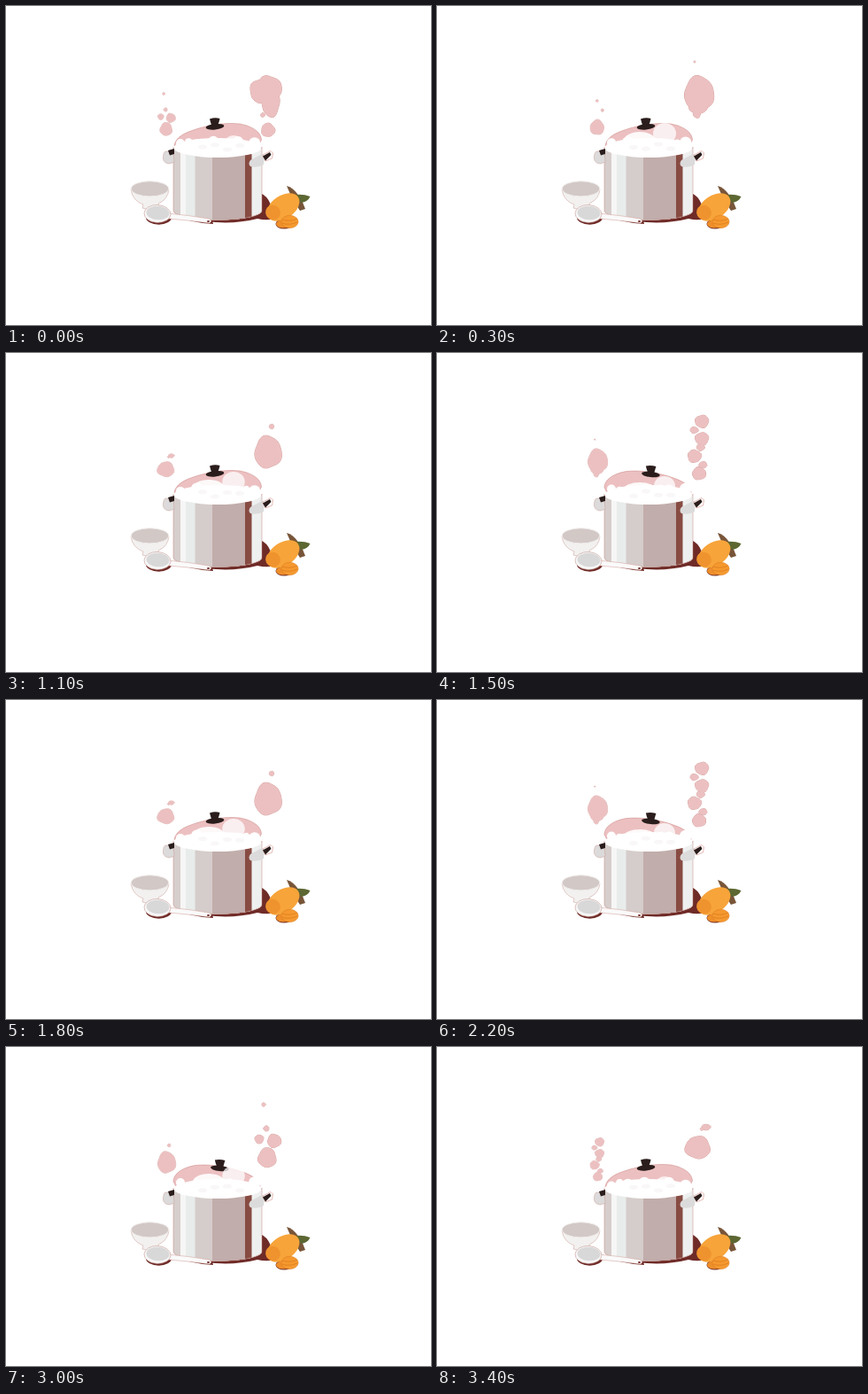
Write an HTML page with a canvas that moves like this. It is 480 px wide and 360 px high and loops after 3500 ms.

```html
<!DOCTYPE html>
<html lang="en">
<head>
<meta charset="utf-8">
<title>Boiling pot</title>
<style>
html, body { margin: 0; width: 100%; height: 100%; overflow: hidden; background: #fff; }
canvas { display: block; }
</style>
</head>
<body>
<canvas id="stage" width="480" height="360"></canvas>
<script>
const ctx = document.getElementById('stage').getContext('2d');
const LOOP = 3500, STEP = 100, STEAM_STEPS = 7, LID_HOLD = 4;
const PINK = '#ecc0c1', EDGE = '#c98580', SHADOW = '#6f2b27', DARK = '#2a1d1c';
const { PI, sin, cos } = Math;

function shape(path, fill, edge, width = 0.5) {
  const p = typeof path === 'string' ? new Path2D(path) : path;
  if (fill) { ctx.fillStyle = fill; ctx.fill(p); }
  if (edge) { ctx.strokeStyle = edge; ctx.lineWidth = width; ctx.stroke(p); }
}
function oval(x, y, rx, ry, fill, edge, turn = 0, width) {
  const p = new Path2D();
  p.ellipse(x, y, rx, ry, turn, 0, PI * 2);
  shape(p, fill, edge, width);
}

// an oval with an uneven rim, its bumps set by its place
function puff({ x, y, rx, ry = rx }) {
  const p = new Path2D();
  for (let a = 0; a < PI * 2; a += 0.15) {
    const k = 1 + 0.05 * sin(3 * a + x) + 0.03 * sin(5 * a + y);
    p.lineTo(x + rx * k * cos(a), y + ry * k * sin(a));
  }
  p.closePath();
  return p;
}
const at = (x, y, rx, ry) => ({ x, y, rx, ry });

// a column of separate puffs, alternating large and small
function column() {
  return Array.from({ length: 7 }, (_, i) =>
    at(296 + 5.5 * sin(i * 2.2), 136 - i * 9.8, i % 2 ? 4.5 : 7.5, i % 2 ? 3.5 : 7));
}
// a cloud narrowing to a tail below
function drop(x, y, rx, ry) {
  return [at(x, y, rx, ry), at(x - 1, y + ry * 0.75, rx * 0.6, ry * 0.4),
          at(x - 2.5, y + ry * 1.15, rx * 0.25, ry * 0.25)];
}
// puffs form a column, gather, sink back and swell again
const poses = [
  [at(297, 93, 14, 14), at(286, 96, 10, 13), at(299, 109, 10, 16), at(296, 140, 7.5), at(290, 123, 2.3)],
  column(),
  [at(295, 125, 10, 11), at(303, 106, 7.5), at(286, 104, 4.8), at(294, 92, 3), at(291, 65, 2)],
  [...drop(296, 99, 16.5, 19.5), at(291, 63, 1)],
  [at(296, 112, 15, 18), at(300, 83, 2.6)],
  [at(295, 122, 11.5, 12.5), at(304, 93, 2.4), at(295, 77, 2)],
  [at(294.5, 113.5, 14, 12.5), at(304, 90.5, 4.8, 3.2), at(299, 92.5, 1.6)]
];

function steam(pose) {
  const paths = pose.map(puff);
  paths.forEach(p => shape(p, null, EDGE, 0.8));
  paths.forEach(p => shape(p, PINK));
}

function lid(flip) {
  ctx.save();
  if (flip) { ctx.translate(477.4, 0.6); ctx.scale(-1, 1); }
  shape('M190 158 Q191 148 206 142 C224 135 246 131 264 133 C280 136 288 143 288.5 151 L284 160 Z', PINK, EDGE);
  oval(236, 136.3, 10.4, 3.2, DARK, null, -0.1);
  shape('M230 127.5 Q236 125.5 241.5 127 L240.5 131 L238.5 136 L232.5 136 Z', DARK);
  ctx.restore();
}

function froth(k) {
  const rise = sin(PI * k / 6);
  oval(239, 160, 49.5, 11, '#fff');
  for (let i = 0; i < 10; i++) {
    const r = 5 + 1.8 * sin(i * 3.7);
    oval(197 + i * 9.3, 155 - 2 * sin(i * 2.1 + k * 0.9), r, r, '#fff');
  }
  oval(229, 155 - rise * 3, 18, 5 + rise * 5, 'rgba(255,255,255,.9)');
  oval(257, 156 - rise * 12, 11 + rise * 2, 10 + rise * 2, 'rgba(255,255,255,.75)');
  for (let i = 0; i < 4; i++) oval(222 + i * 14, 159 + 3 * sin(i * 4 + k), 5, 2.5, '#f9f7f7');
}

function pot() {
  shape('M287 211 Q295 214 299 224 L307 239 Q296 243 284 240 Q256 247 226 243 L240 230 Z', SHADOW);
  const body = new Path2D('M189 159 A50 11 0 0 0 289 159 L289 231 A50 10.5 0 0 1 189 231 Z');
  const strips = [[189, '#d6cecc'], [197, '#f5f6f5'], [203, '#e8ecea'], [213.5, '#d5cdcb'],
                  [233, '#c1adab'], [270, '#874b42'], [277.5, '#eef0ef']];
  ctx.save();
  ctx.clip(body);
  for (const [x, color] of strips) {
    ctx.fillStyle = color;
    ctx.fillRect(x, 150, 290 - x, 100);
  }
  ctx.restore();
  shape(body, null, '#bd8a83');
}

function handles() {
  shape('M189 164 L180 164 Q177 166 177.5 173 Q179 178 185 178 L190 176 Z', '#dcdada', '#c9a09b');
  shape('M183 163 L190 161 L190 167 L185 168.5 Z', DARK);
  shape('M276 174 L289 167 L292 169 L291 179 Q284 183 276 181 Q273 178 276 174 Z', '#dcdbdb');
  shape('M290 168 L299 163.5 L301.5 166 L300.5 172 L293 175 Z', '#fff', '#c9746b');
  shape('M290 169.5 L298 165 L299.5 168 L293 174.5 Z', DARK);
}

function bowl() {
  shape('M141 207 Q143 220 155 224 L154 228 Q163 231 173 227 L172 223 Q183 218 184 207 Z', '#f2f1f0', '#c99a93');
  oval(162.5, 206.3, 21.2, 8.6, '#d2c8c6', '#f1eeed', 0, 1);
}

function spoon() {
  oval(172.5, 238.5, 14.5, 8.3, SHADOW);
  shape('M186 238 L222 245 L234 246 L233 242 Z', SHADOW);
  shape('M183 234 Q205 236 229 240 Q234 242 230 245 Q208 242 184 240 Z', '#fafafa', '#cf9b95');
  oval(228.5, 243, 1.5, 1, SHADOW);
  oval(171, 234.5, 15, 10, '#f7f7f7', '#b98881', 0.05);
  oval(171.5, 233.5, 13, 7.8, '#d9d8d9', null, 0.05);
}

function carrot() {
  oval(314, 246, 9.5, 5.5, SHADOW);
  shape('M317 203 Q324 205 329 212 L334 219 L338 229 L332 231 L324 219 Z', '#785539');
  shape('M327 213 Q336 212 343.5 215 Q341 221 333 222 Z', '#5c6732');
  oval(313, 227, 20.5, 13, '#f7a43a', null, -0.6);
  oval(301.5, 233, 8.6, 8.2, '#ef932f', null, 0.7);
  oval(313, 246, 8, 4.6, '#ee8e2a');
  oval(320.5, 243.5, 9.6, 7.2, '#f5992f', '#d9791f');
  for (const y of [241, 245]) shape(`M312 ${y} Q320 ${y + 3} 329 ${y - 1}`, null, '#dc7d20', 0.8);
}

function draw(ms) {
  const tick = Math.floor((ms % LOOP) / STEP), k = tick % STEAM_STEPS;
  ctx.fillStyle = '#fff';
  ctx.fillRect(0, 0, 480, 360);
  steam(poses[k]);
  // the left plume is a smaller copy running two steps ahead
  ctx.save();
  ctx.translate(181.5, 103);
  ctx.scale(2 / 3, 2 / 3);
  ctx.translate(-296, -71);
  steam(poses[(k + 2) % STEAM_STEPS]);
  ctx.restore();
  pot();
  lid(Math.floor(tick / LID_HOLD) % 2 === 1);
  froth(k);
  handles();
  bowl();
  spoon();
  carrot();
}

const start = performance.now();
function frame() {
  draw(performance.now() - start);
  requestAnimationFrame(frame);
}
frame();
</script>
</body>
</html>
```
